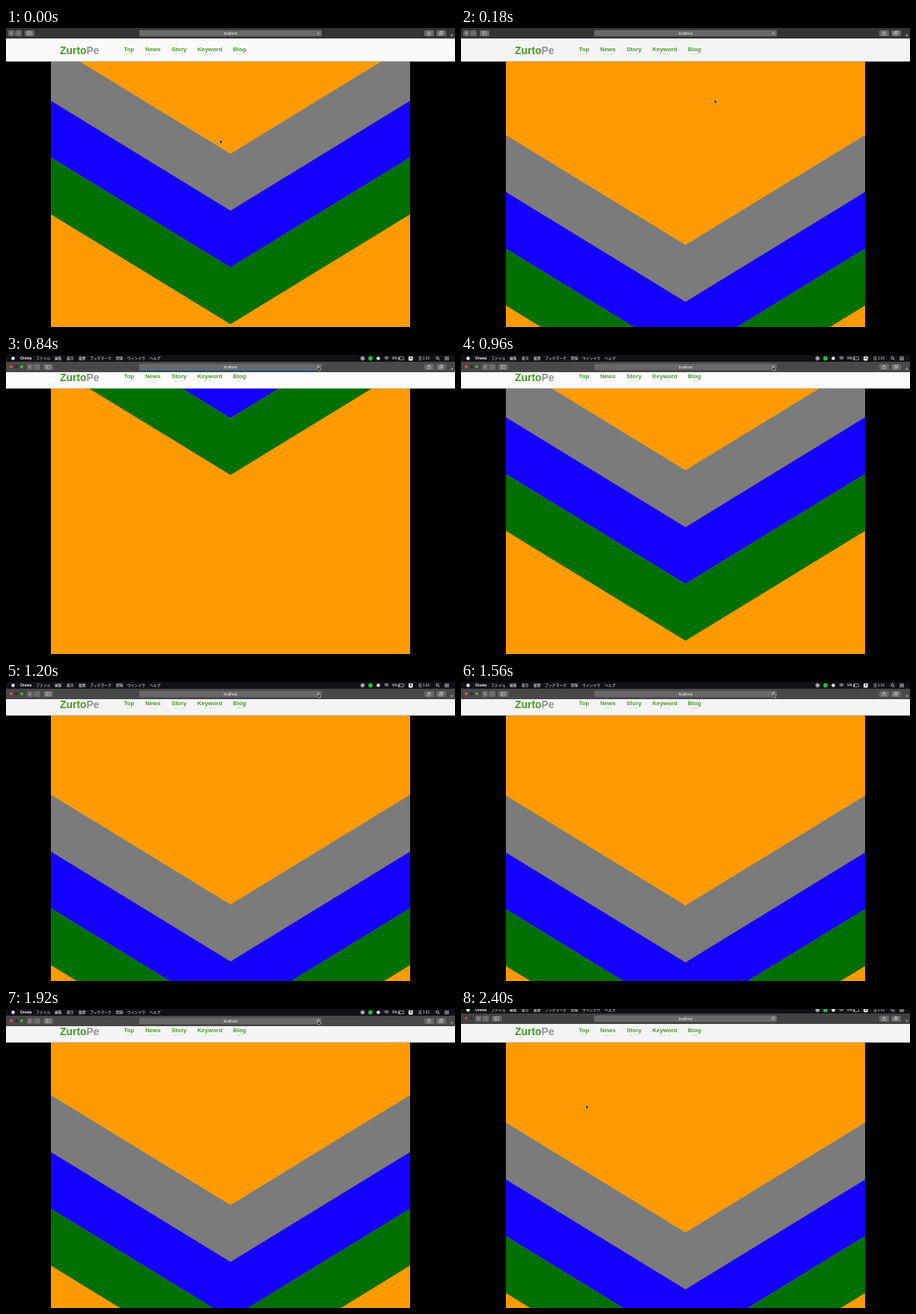
An HTML page with a canvas for the animation above (2460 ms loop, 600x400 px).

```html
<!DOCTYPE html>
<html lang="ja">
<head>
<meta charset="utf-8">
<style>
  html, body { margin: 0; width: 100%; height: 100%; overflow: hidden; background: #000; }
  canvas { display: block; }
</style>
</head>
<body>
<canvas id="stage" width="600" height="400"></canvas>
<script>
const ctx = document.getElementById('stage').getContext('2d');
const LOOP = 2460, SLIDE = 432, TRAVEL = 400, REST = 299;
const STARTS = [-169, 801, 1646];
const LOADING = [[0, 300], [800, 1260], [1620, 1860]];
const SANS = '"Liberation Sans", Arial, sans-serif';
const CJK = '"Noto Sans CJK JP", "Noto Sans CJK", sans-serif';

const clamp = v => Math.min(1, Math.max(0, v));
const ramp = (t, from, to) => clamp((t - from) / (to - from));
const mix = (a, b, k) => a + (b - a) * k;
const gray = v => `rgb(${v},${v},${v})`;
const bezier = (s, a, b) => 3 * s * (1 - s) ** 2 * a + 3 * s * s * (1 - s) * b + s ** 3;

// Same curve as the CSS keyword "ease".
function ease(x) {
  let lo = 0, hi = 1;
  for (let i = 0; i < 24; i++) {
    const mid = (lo + hi) / 2;
    if (bezier(mid, .25, .25) < x) lo = mid; else hi = mid;
  }
  return bezier(lo, .1, 1);
}

function rect(x, y, w, h, color, r = 0) {
  ctx.fillStyle = color;
  ctx.beginPath();
  ctx.roundRect(x, y, w, h, r);
  ctx.fill();
}

function dot(x, y, r, color) {
  ctx.fillStyle = color;
  ctx.beginPath();
  ctx.arc(x, y, r, 0, 7);
  ctx.fill();
}

function arc(x, y, r, from, to, color = '#ddd', width = .7) {
  ctx.strokeStyle = color;
  ctx.lineWidth = width;
  ctx.beginPath();
  ctx.arc(x, y, r, from, to);
  ctx.stroke();
}

function line(color, ...pts) {
  ctx.strokeStyle = color;
  ctx.lineWidth = .7;
  ctx.beginPath();
  for (let i = 0; i < pts.length; i += 2) ctx.lineTo(pts[i], pts[i + 1]);
  ctx.stroke();
}

function box(x, y, w, h, color = '#ccc') {
  ctx.strokeStyle = color;
  ctx.lineWidth = .6;
  ctx.strokeRect(x, y, w, h);
}

function text(s, x, y, font, color, align = 'left') {
  ctx.font = font;
  ctx.fillStyle = color;
  ctx.textAlign = align;
  ctx.fillText(s, x, y);
}

function drawStripes(tip) {
  ctx.save();
  ctx.beginPath();
  ctx.rect(60, 0, 480, 400);
  ctx.clip();
  rect(60, 0, 480, 400, '#ff9b00');
  ['#7b7b7b', '#1400ff', '#007000'].forEach((color, i) => {
    const y = tip + i * 76;
    ctx.fillStyle = color;
    ctx.beginPath();
    [[60, y - 147], [300, y], [540, y - 147], [540, y - 71], [300, y + 76], [60, y - 71]]
      .forEach(p => ctx.lineTo(...p));
    ctx.fill();
  });
  ctx.restore();
}

function drawHeader(tip) {
  rect(0, 0, 600, 45, gray(mix(251, 244, ramp(tip, 150, 290))));
  rect(0, 44.3, 600, .7, '#b8b8b8');
  text('Zurto', 72, 35.4, `bold 13.9px ${SANS}`, '#479a28');
  text('Pe', 72 + ctx.measureText('Zurto').width, 35.4, `bold 13.9px ${SANS}`, '#92929a');
  [['Top', 164.5, 'トップ'], ['News', 196.3, 'ニュース'], ['Story', 231.3, 'ストーリー'],
   ['Keyword', 272.3, 'キーワード'], ['Blog', 312, 'ブログ']].forEach(([name, x, sub]) => {
    text(name, x, 31, `bold 7.9px ${SANS}`, '#479a28', 'center');
    text(sub, x, 36, `2.8px ${CJK}`, '#a9a9a9', 'center');
  });
}

function drawToolbar(show, loading, age) {
  ctx.save();
  ctx.translate(0, 9 * show);
  rect(0, -1, 600, 15, gray(mix(52, 72, show)));
  ctx.globalAlpha = show;
  ['#f0503c', '#2c2c2c', '#38bd48'].forEach((c, i) => dot(7 + 7 * i, 6.7, 2, c));
  ctx.globalAlpha = 1;

  ctx.save();
  ctx.translate(25 * show, 0);
  [[3, 8], [12, 9], [25, 13]].forEach(([x, w]) => rect(x, 3, w, 8, '#686868', 1.5));
  line('#eee', 8, 5, 6, 7, 8, 9);
  line('#999', 16, 5, 18, 7, 16, 9);
  box(28.5, 5, 5.5, 4);
  line('#ccc', 30.5, 5, 30.5, 9);
  ctx.restore();

  rect(178, 2.7, 244, 8.6, '#686868', 1.5);
  if (age < 120) rect(178, 10.3, 236, 1, '#2f86c8');
  text('localhost', 300, 8.6, `4.5px ${SANS}`, '#fff', 'center');
  if (loading) {
    line('#ddd', 415.8, 5.4, 418.8, 8.4);
    line('#ddd', 418.8, 5.4, 415.8, 8.4);
  } else {
    arc(417.3, 7, 1.8, -.4, 4.7);
    line('#ddd', 416.8, 4, 418.3, 5.2, 416.8, 6.2);
  }
  [559, 575].forEach(x => rect(x, 3, 13, 8, '#686868', 1.5));
  box(563.5, 6, 4, 3.5);
  line('#ddd', 565.5, 7.5, 565.5, 4);
  box(578.8, 6, 3.6, 3.2);
  box(580.2, 4.6, 3.6, 3.2);
  line('#aaa', 593.5, 9.7, 598, 9.7);
  line('#aaa', 595.75, 7.5, 595.75, 12);
  ctx.restore();
}

function drawMenuBar(show) {
  if (!show) return;
  ctx.save();
  ctx.translate(0, 9 * (show - 1));
  rect(0, 0, 600, 9, '#101016');
  dot(9.5, 4.5, 2.2, '#fff');
  text('Orveta', 19, 6, `bold 4.8px ${SANS}`, '#fff');
  [['ファイル', 40], ['編集', 65], ['表示', 81], ['履歴', 97], ['ブックマーク', 112],
   ['開発', 147], ['ウインドウ', 162], ['ヘルプ', 192]]
    .forEach(([s, x]) => text(s, x, 6.2, `4.8px ${CJK}`, '#fff'));

  arc(476.5, 4.5, 2.4, 0, 7, '#fff');
  dot(476.5, 4.5, 1.3, '#fff');
  dot(487, 4.5, 2.9, '#19c52f');
  dot(497.5, 4.5, 2.3, '#eee');
  [1.5, 3, 4.5].forEach(r => arc(508.5, 7, r, -2.35, -.8, '#fff'));
  text('9%', 516, 6.2, `4.8px ${SANS}`, '#fff');
  box(524.5, 2.8, 7, 3.6, '#ddd');
  rect(525.2, 3.5, 1, 2.2, '#fff');
  rect(538, 1.8, 5.6, 5.6, '#fff', .8);
  text('A', 540.8, 6.2, `bold 4.6px ${SANS}`, '#222', 'center');
  text('日 1:31', 551, 6.2, `4.8px ${CJK}`, '#fff');
  arc(576.5, 4, 1.7, 0, 7, '#fff');
  line('#fff', 577.8, 5.3, 579.5, 7);
  [2.8, 4.6, 6.4].forEach(y => line('#fff', 586, y, 592, y));
  ctx.restore();
}

function drawCursor(x, y) {
  ctx.beginPath();
  [[0, 0], [0, 5], [1.1, 4], [1.9, 5.8], [2.7, 5.4], [2, 3.7], [3.5, 3.6]]
    .forEach(([dx, dy]) => ctx.lineTo(x + dx, y + dy));
  ctx.closePath();
  ctx.fillStyle = '#000';
  ctx.strokeStyle = '#ddd';
  ctx.lineWidth = .5;
  ctx.fill();
  ctx.stroke();
}

function draw(t) {
  const age = t - STARTS.filter(s => s <= t).pop();
  const tip = REST - TRAVEL * (1 - ease(clamp(age / SLIDE)));
  const show = ramp(t, 330, 450) * (1 - ramp(t, 2370, 2460));
  const loading = LOADING.some(([from, to]) => t >= from && t < to);
  const there = ramp(t, 60, 360), away = ramp(t, 2240, 2400);

  rect(0, 0, 600, 400, '#000');
  drawStripes(tip);
  drawHeader(tip);
  drawToolbar(show, loading, age);
  drawMenuBar(show);
  drawCursor(mix(mix(286, 417, there), 167, away), mix(mix(149.5, 16, there), 128.5, away));
}

function tick() {
  draw(performance.now() % LOOP);
  requestAnimationFrame(tick);
}
tick();
</script>
</body>
</html>
```
